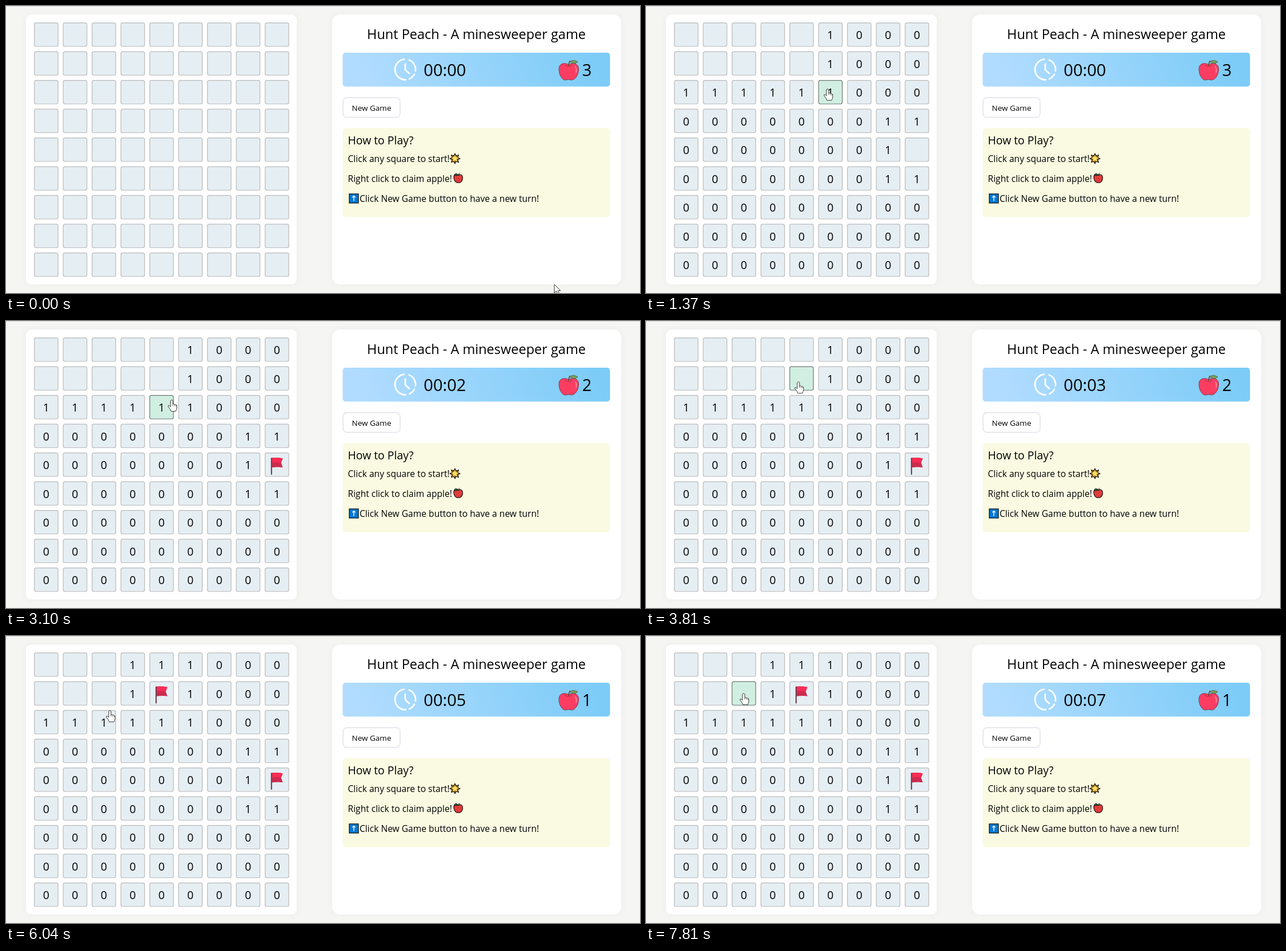
Animation of 1110x504 px, one loop 8000 ms. Source, as an HTML page:

```html
<!DOCTYPE html>
<html lang="en">
<head>
<meta charset="utf-8">
<title>Minesweeper</title>
<style>
  html, body { margin: 0; width: 100%; height: 100%; overflow: hidden; background: #f5f5f4; }
  svg { display: block; width: 100%; height: 100%; }
  text { font-family: "Open Sans", "Noto Sans", sans-serif; fill: #000; }
  .mid { text-anchor: middle; }
  .panel { fill: #fff; filter: drop-shadow(0 0 6px rgba(0, 0, 0, .035)); }
  .cell { fill: #e5eef3; stroke: #b9b9b9; stroke-width: 1.2; }
  .cell.hover { fill: #d1eee2; stroke: #6f7673; }
  .num { font-size: 19.4px; }
  .big { font-size: 29px; }
  .note { font-size: 15.6px; }
</style>
</head>
<body>
<svg viewBox="0 0 1110 504" xmlns="http://www.w3.org/2000/svg">
  <defs>
    <linearGradient id="sky" gradientUnits="userSpaceOnUse" x1="640" y1="182" x2="1008" y2="42">
      <stop stop-color="#b1dcff"/><stop offset="1" stop-color="#7dccf7"/>
    </linearGradient>
    <g id="flag">
      <path d="M-8-13Q1-14 11-12L8-4.500L11 4Q3 2.500-8 4Z" fill="#cd2a4d"/>
      <path d="M-8-13Q1-14 11-12L8-4.500Q0-6-8-4.500Z" fill="#fb2b55"/>
      <path d="M-8.800-13V16.500" stroke="#5d3947" stroke-width="2"/>
    </g>
  </defs>

  <rect width="1110" height="504" fill="#f5f5f4"/>
  <rect width="1110" height="1" fill="#d9d9d9"/>
  <rect class="panel" x="35" y="15" width="474" height="474" rx="9"/>
  <rect class="panel" x="571" y="15" width="506" height="474" rx="14"/>
  <g id="board"></g>

  <text class="mid" x="823.5" y="58" font-size="23.5">Hunt Peach - A minesweeper game</text>
  <rect x="589.5" y="82" width="468" height="59.5" rx="5" fill="url(#sky)"/>

  <g fill="none" stroke="#fff" stroke-width="2.8" stroke-linecap="round" stroke-linejoin="round">
    <path id="ring"/>
    <path d="M699 102V112L706 118.500"/>
  </g>
  <text class="big" id="clock" x="731.3" y="123.3"></text>

  <g stroke-linejoin="round">
    <path d="M985 103C979 99 968 100 968 111C968 121 974 131 980 130Q985 128 990 130C997 130 1003 120 1002.500 110C1002 100 991 99 985 103Z" fill="#fc3d62" stroke="#7d4050"/>
    <path d="M979 104Q985 108 991 104" fill="none" stroke="#b72b4c" stroke-width="1.2"/>
    <path d="M996 106Q1000 110 998 117" fill="none" stroke="#ff8fa6" stroke-width="1.6"/>
    <path d="M985 105Q985 99 988 96" fill="none" stroke="#664b35" stroke-width="1.6"/>
    <path d="M987 98Q993 93 1001 98Q995 104 987 98Z" fill="#75a25b" stroke="#52633f" stroke-width=".9"/>
  </g>
  <text class="big" id="left" x="1008.8" y="123.3"></text>

  <rect x="590" y="161" width="100" height="34.5" rx="7" fill="#fff" stroke="#dfe1ea" stroke-width="1.4"/>
  <text class="mid" x="640" y="183.5" font-size="13.5">New Game</text>

  <rect x="589.5" y="214.5" width="468" height="156.5" rx="6" fill="#f9fae1"/>
  <text x="598.5" y="243" font-size="19.4">How to Play?</text>
  <text class="note" x="598.5" y="273.5">Click any square to start!</text>
  <text class="note" x="598.5" y="308.5">Right click to claim apple!</text>
  <text class="note" x="619" y="343.5">Click New Game button to have a new turn!</text>

  <path id="burst" fill="#b87a1a" stroke="#111" stroke-width="1.2"/>
  <path id="star" fill="#ffe467"/>
  <g stroke="#151515" stroke-width="1.2" stroke-linejoin="round">
    <path d="M792 297.500C787 294 783.500 297 784 302C784.500 307 788 311.500 792 310C796 311.500 799.500 307 799.500 302C799.500 296 795 295 792 297.500Z" fill="#e33a37"/>
    <path d="M785 297Q786 293 791 296Q788 299 785 297Z" fill="#3f7d38"/>
    <path d="M792 298L793.500 293.500" fill="none"/>
  </g>
  <rect x="601" y="330" width="16" height="16" fill="#0078d7" stroke="#111" stroke-width="1.3"/>
  <path d="M609 342.500V333.500M606.300 336.200L609 333.500L611.700 336.200" fill="none" stroke="#fff" stroke-width="1.4"/>

  <g id="pointer" stroke="#333" stroke-linejoin="round">
    <circle id="press" cy="1" r="11" fill="#f0f000" opacity=".65" stroke="none"/>
    <path id="arrow" fill="#fff" d="M0 0V15L3.700 11.600L6.200 17.600L8.800 16.500L6.300 10.800H11Z"/>
    <g id="hand">
      <path fill="#fff" d="M-2 1.800Q0-1.200 2 1.800V8Q4 6.500 5 8.500Q7 7.500 7.500 9.500Q9.500 9 9 12V14Q9 17 7 20.500H-1Q-2 17-6 12.500Q-7 9.500-4 10.500L-2 12.500Z"/>
      <path fill="none" d="M2 8V11M5 9V11.500M7.500 10V12" stroke-width=".8"/>
    </g>
  </g>
</svg>
<script>
const LOOP = 8000, STEP = 77.5, PRESS = 120, START = 810;
const COUNT = 9, LEFT = 49.1, TOP = 29, PITCH = 50.5, SIZE = 42.6;
const NS = 'http://www.w3.org/2000/svg';
const $ = id => document.getElementById(id);

const mines = [[1, 1], [4, 1], [8, 4]];

// Pointer moves: leave and arrive times, target in cell units, optional click
const moves = [
  { leave: 60, arrive: 215, col: 7.87, row: 0 },
  { leave: 395, arrive: 690, col: 6, row: 3, open: 780 },
  { leave: 800, arrive: 1290, col: 4.9, row: 1.88 },
  { leave: 1440, arrive: 2080, col: 7.83, row: 3.88, flag: 2460 },
  { leave: 2570, arrive: 2930, col: 4.49, row: 1.93 },
  { leave: 3040, arrive: 3630, col: 3.89, row: 1.11, flag: 4190 },
  { leave: 4200, arrive: 4560, col: 3.91, row: .23, open: 4730 },
  { leave: 4880, arrive: 5030, col: 2.78, row: .05, open: 5420 },
  { leave: 5420, arrive: 5640, col: 2.86, row: .98, open: 5970 },
  { leave: 5905, arrive: 6250, col: 2, row: 1.78 },
  { leave: 6400, arrive: 6580, col: 2, row: 1.48 },
  { leave: 7200, arrive: 7740, col: 1.99, row: .99 }
];

function add(tag, attrs) {
  const el = document.createElementNS(NS, tag);
  for (const k in attrs) el.setAttribute(k, attrs[k]);
  return $('board').appendChild(el);
}

const polar = (cx, cy, r, deg) => {
  const a = deg * Math.PI / 180;
  return (cx + r * Math.cos(a)).toFixed(2) + ' ' + (cy + r * Math.sin(a)).toFixed(2);
};

function spikes(count, outer, inner) {
  const pts = Array.from({ length: count * 2 }, (_, i) =>
    polar(786, 268, i % 2 ? inner : outer, 180 * i / count - 90));
  return 'M' + pts.join('L') + 'Z';
}

const arc = (from, to) =>
  `M${polar(699, 111.5, 18, from)}A18 18 0 ${+(to - from > 180)} 1 ${polar(699, 111.5, 18, to)}`;

$('burst').setAttribute('d', spikes(8, 8.8, 5.3));
$('star').setAttribute('d', spikes(5, 6.6, 2.8));
$('ring').setAttribute('d', arc(88, 264) + arc(292, 368) + arc(28, 66));

const near = (a, b) => Math.abs(a.col - b.col) < 2 && Math.abs(a.row - b.row) < 2;
const cells = Array.from({ length: COUNT * COUNT }, (_, i) => {
  const col = i % COUNT, row = Math.floor(i / COUNT);
  const count = mines.filter(([c, r]) => near({ col, row }, { col: c, row: r })).length;
  return { col, row, count, x: LEFT + col * PITCH, y: TOP + row * PITCH, since: Infinity };
});

// Opening an empty cell spreads to its neighbours
function open(cell, time) {
  if (cell.since <= time) return;
  cell.since = time;
  if (!cell.count) cells.filter(c => near(c, cell)).forEach(c => open(c, time));
}

for (const m of moves) {
  const cell = cells[Math.round(m.row) * COUNT + Math.round(m.col)];
  if (m.open) open(cell, m.open);
  if (m.flag) Object.assign(cell, { since: m.flag, flagged: true });
}

for (const c of cells) {
  const mid = c.x + SIZE / 2;
  c.box = add('rect', { class: 'cell', x: c.x + .6, y: c.y + .6, width: SIZE - 1.2, height: SIZE - 1.2, rx: 3 });
  if (c.flagged) {
    c.face = add('use', { href: '#flag', transform: `translate(${mid - .8} ${c.y + 22.3})` });
  } else {
    c.face = add('text', { class: 'num mid', x: mid - .2, y: c.y + 29.2 });
    c.face.textContent = c.count;
  }
}

const ease = k => 1 - (1 - k) ** 3;
const show = (el, on) => el.setAttribute('visibility', on ? 'visible' : 'hidden');
const inside = (c, x, y, pad) =>
  Math.max(Math.abs(x - c.x - SIZE / 2), Math.abs(y - c.y - SIZE / 2)) < SIZE / 2 + pad;

function tipAt(t) {
  let x = 960, y = 489;
  for (const m of moves) {
    const k = ease(Math.min(1, Math.max(0, (t - m.leave) / (m.arrive - m.leave))));
    x += (LEFT + SIZE / 2 + m.col * PITCH - x) * k;
    y += (TOP + SIZE / 2 + m.row * PITCH - y) * k;
  }
  return [x, y];
}

function draw(t) {
  // the pointer moves in discrete steps
  const [x, y] = tipAt(Math.floor((t + 20) / STEP) * STEP - 10);
  for (const c of cells) {
    c.box.classList.toggle('hover', inside(c, x, y, -1.5));
    show(c.face, t >= c.since);
  }
  const hand = cells.some(c => inside(c, x, y, 1));
  show($('hand'), hand);
  show($('arrow'), !hand);
  show($('press'), moves.some(m => {
    const click = m.open || m.flag;
    return t >= click - PRESS && t < click;
  }));
  $('pointer').setAttribute('transform', `translate(${x.toFixed(1)} ${y.toFixed(1)})`);
  $('clock').textContent = '00:0' + Math.max(0, Math.floor((t - START) / 1000));
  $('left').textContent = mines.length - moves.filter(m => m.flag <= t).length;
}

function loop() {
  draw(performance.now() % LOOP);
  requestAnimationFrame(loop);
}
loop();
</script>
</body>
</html>
```
